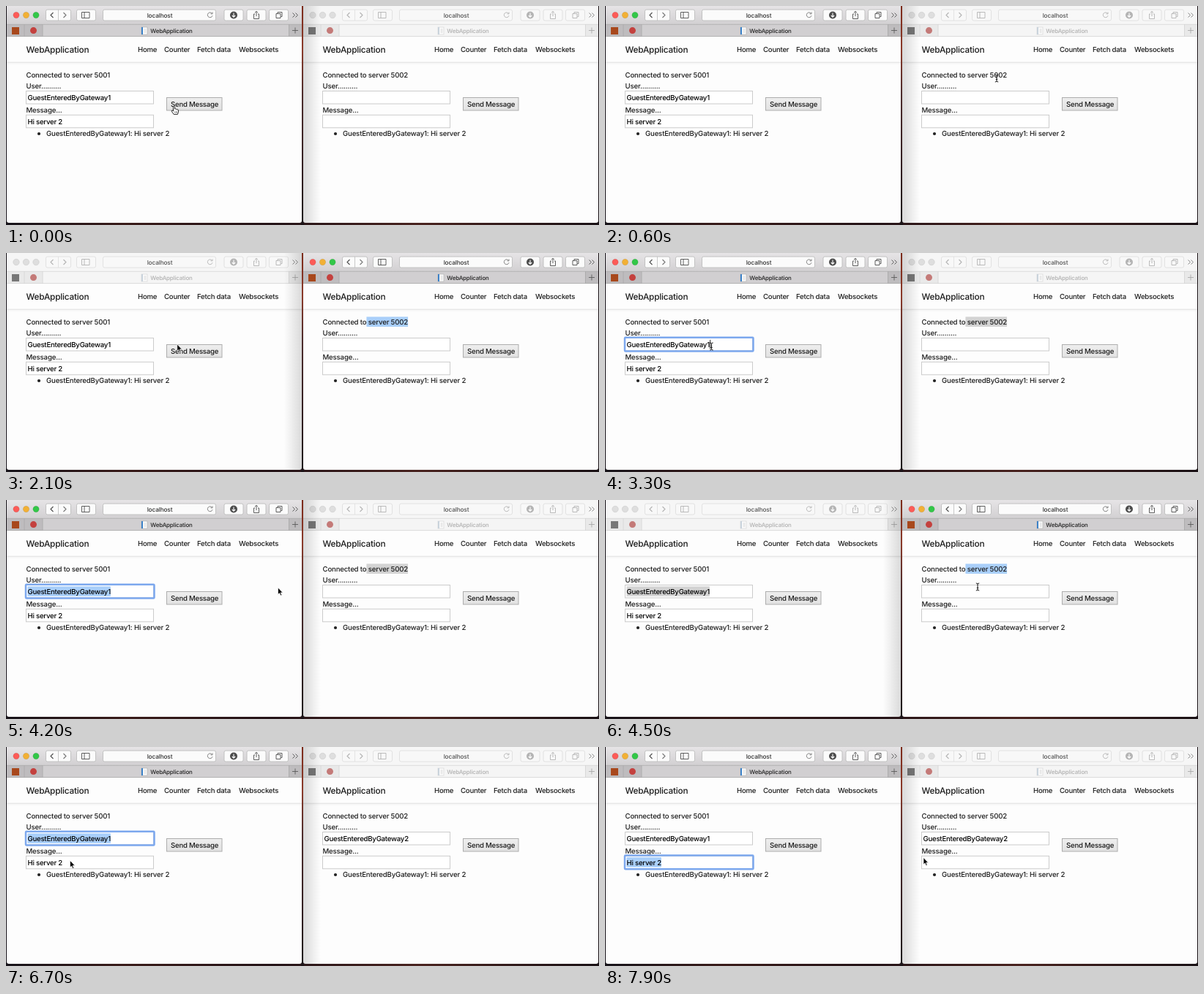
Animation of 810x300 px, one loop 8000 ms. Source, as an HTML page:

```html
<!DOCTYPE html>
<html lang="en">
<head>
<meta charset="utf-8">
<title>Two connected browsers</title>
<style>
html, body { margin: 0; width: 100%; height: 100%; overflow: hidden; background: #2b1613; }
svg { display: block; width: 810px; height: 300px; }
text { font: 450 9.65px Inter, "Open Sans", sans-serif; letter-spacing: -.018em; text-rendering: geometricPrecision; fill: #1c1c1c; white-space: pre; }
.brand { font-size: 11.8px; }
.nav { letter-spacing: -.025em; }
.tab { font-size: 7.9px; }
.addr { font-size: 8.3px; }
.field { fill: #000; }
</style>
</head>
<body>
<svg id="stage" viewBox="0 0 810 300">
  <defs>
    <linearGradient id="bar" x2="0" y2="1"><stop stop-color="#e6e4e6"/><stop offset="1" stop-color="#d2d0d2"/></linearGradient>
    <linearGradient id="desk"><stop stop-color="#17141a"/><stop offset=".2" stop-color="#3a1c1a"/><stop offset=".45" stop-color="#241418"/><stop offset=".7" stop-color="#4a2420"/><stop offset="1" stop-color="#1a1216"/></linearGradient>
    <linearGradient id="gap" x2="0" y2="1"><stop stop-color="#7c2c1c"/><stop offset=".2" stop-color="#8a3a2a"/><stop offset=".4" stop-color="#4c2c2c"/><stop offset="1" stop-color="#1c1418"/></linearGradient>
    <linearGradient id="push" x2="0" y2="1"><stop stop-color="#eeeeee"/><stop offset="1" stop-color="#e2e2e2"/></linearGradient>
    <linearGradient id="shadeL"><stop stop-color="#000" stop-opacity="0"/><stop offset="1" stop-color="#000" stop-opacity=".14"/></linearGradient>
    <linearGradient id="shadeR"><stop stop-color="#000" stop-opacity=".14"/><stop offset="1" stop-color="#000" stop-opacity="0"/></linearGradient>
  </defs>
</svg>
<script>
const LOOP = 8000, STEP = 100;
const GUEST = "GuestEnteredByGateway";
const stage = document.getElementById("stage");

function el(tag, attrs, parent, content) {
  const node = document.createElementNS("http://www.w3.org/2000/svg", tag);
  for (const k in attrs) node.setAttribute(k, attrs[k]);
  if (content) node.textContent = content;
  parent.append(node);
  return node;
}
const box = (g, x, y, w, h, fill, more) => el("rect", { x, y, width: w, height: h, fill, ...more }, g);
const line = (g, d, stroke, width = 1, more) =>
  el("path", { d, fill: "none", stroke, "stroke-width": width, ...more }, g);
const dot = (g, cx, cy, r, fill, more) => el("circle", { cx, cy, r, fill, ...more }, g);
const label = (g, x, y, str, cls = "", more) => el("text", { x, y, class: cls, ...more }, g, str);
const show = (node, on) => node.setAttribute("visibility", on ? "visible" : "hidden");

function drawChrome(parent, on) {
  const g = el("g", {}, parent);
  const ink = on ? "#4c4c4c" : "#b4b4b4";
  const rim = on ? "#bdbdbd" : "#dedede";
  const face = on ? "#fbfbfb" : "#f8f8f8";
  const edge = on ? "#a9a9a9" : "#d3d3d3";
  const mid = { "text-anchor": "middle" };

  box(g, 1, 0, 403, 25, on ? "url(#bar)" : "#f6f6f6");
  ["#fc5b57", "#f2b035", "#33c748"].forEach((c, i) =>
    dot(g, 14 + i * 13.5, 12.5, 4.2, on ? c : "#dedede", { stroke: on ? "#0002" : "#cbcbcb", "stroke-width": .6 }));

  const key = (x, w) => box(g, x, 5, w, 15, face, { rx: 2.2, stroke: rim, "stroke-width": .9 });
  key(54.5, 34); key(96.5, 26); key(132.5, 154); key(298, 26); key(329, 26); key(359.5, 26);
  line(g, "M71.5 5V20", rim, .8);
  line(g, "M64.5 9L61 12.5L64.5 16", ink, 1.1);
  line(g, "M78.5 9L82 12.5L78.5 16", on ? "#777" : ink, 1.1);
  line(g, "M103.5 8.5H114V16.5H103.5ZM107 8.5V16.5", ink, .9);
  line(g, "M281.5 10.3A3.4 3.4 0 1 0 282 13.2M282 8.4V10.8H279.6", on ? "#777" : ink, .9);
  dot(g, 311, 12.5, 5, ink);
  line(g, "M311 9.5V15M308.8 13L311 15.2L313.2 13", "#fff", 1.1);
  line(g, "M340 11H338.5V17.5H345.5V11H344M342 14V7.5M340 9.2L342 7.2L344 9.2", ink, .9);
  line(g, "M371 10V8.5H377V14.5H375.5M369 10.5H375V16.5H369Z", ink, .9);
  line(g, "M391.5 9.5L394.5 12.5L391.5 15.5M395.5 9.5L398.5 12.5L395.5 15.5", on ? "#5a5a5a" : "#888", 1);
  label(g, 210, 15.7, "localhost", "addr", { ...mid, style: `fill:${on ? "#333" : "#555"}` });

  box(g, 1, 25, 403, 17, on ? "#bebcbe" : "#e9e9e9");
  box(g, 50, 25, 336, 17, on ? "#d1cfd1" : "#f5f5f5");
  line(g, "M1 25.3H404", edge, .7);
  line(g, "M1 41.6H404M25 25V42M50 25V42M386.5 25V42", edge, .8);
  box(g, 8, 29, 10, 10, on ? "#a8481c" : "#777");
  dot(g, 37.5, 33.6, 4.5, on ? "#c4413e" : "#c47a78");
  box(g, 185, 29, 8, 10, on ? "#fafafa" : "#fbfbfb", { stroke: on ? "#aaa" : "#d0d0d0", "stroke-width": .6 });
  box(g, 185, 29, 2, 10, on ? "#3c82c8" : "#c9d3dc");
  line(g, "M188.5 32H191.5M188.5 34H191.5M188.5 36H191.5", "#c2c2c2", .6);
  label(g, 226, 36.8, "WebApplication", "tab", { ...mid, style: `fill:${on ? "#222" : "#b0b0b0"}` });
  line(g, "M391 33.5H399M395 29.5V37.5", on ? "#5c5c5c" : "#aaa", .9);
  return g;
}

// A text with a selection behind it and a caret.
function drawText(g, x, y, str, cls) {
  const mark = box(g, x, y - 10.6, 0, 13.6, "#a9cffa");
  const text = label(g, x, y, str, cls);
  const caret = box(g, x, y - 10, .9, 12.5, "#111");
  const at = n => x + (n > 0 ? text.getSubStringLength(0, n) : 0);
  return {
    set(s) { if (text.textContent !== s) text.textContent = s; },
    select(from, to, fill) {
      const a = at(from);
      mark.setAttribute("x", a);
      mark.setAttribute("width", to > from ? at(to) - a : 0);
      mark.setAttribute("fill", fill);
    },
    caret(on) {
      caret.setAttribute("x", at(text.textContent.length) + .4);
      show(caret, on);
    }
  };
}

function drawField(g, y) {
  box(g, 27.5, y, 174, 17.5, "#fff", { stroke: "#cbcbcb", "stroke-width": 1 });
  const ring = box(g, 27, y - .8, 175.5, 18.8, "none", { stroke: "#7ca8ee", "stroke-width": 2.5, rx: 1 });
  const text = drawText(g, 29.5, y + 12.4, "", "field nav");
  return { ...text, focus: on => show(ring, on) };
}

function drawWindow(x, port, shadeX, shadeFill) {
  const g = el("g", { transform: `translate(${x})` }, stage);
  box(g, 1, 30, 403, 267, "#fdfdfd", { rx: 3 });
  const on = drawChrome(g, true), off = drawChrome(g, false);

  box(g, 1, 77, 403, 3, "#000", { opacity: .018 });
  line(g, "M1 77.2H404", "#dedede", .9);
  label(g, 27.5, 64, "WebApplication", "brand");
  [["Home", 180], ["Counter", 216], ["Fetch data", 261], ["Websockets", 318]]
    .forEach(([s, nx]) => label(g, nx, 63, s, "nav"));
  const head = drawText(g, 27.5, 98, "Connected to server " + port);
  head.caret(false);
  label(g, 27.5, 112.6, "User..........");
  label(g, 27.5, 145.6, "Message...");
  const user = drawField(g, 116.5), msg = drawField(g, 149.3);
  box(g, 219.5, 125.5, 75.5, 17.5, "url(#push)", { stroke: "#adadad", "stroke-width": 1 });
  label(g, 225, 137.8, "Send Message", "nav");
  dot(g, 45, 175, 2.1, "#222");
  label(g, 55, 178.4, GUEST + "1: Hi server 2");

  const shade = box(g, shadeX, 0, 24, 297, shadeFill);
  return {
    head, user, msg,
    activate(yes) { show(on, yes); show(off, !yes); show(shade, !yes); }
  };
}

box(stage, 0, 0, 810, 300, "url(#desk)");
box(stage, 403, 0, 4, 300, "url(#gap)");
const left = drawWindow(0, 5001, 380, "url(#shadeL)");
const right = drawWindow(405, 5002, 1, "url(#shadeR)");

// Pointers, each with its hot spot at 0,0.
const pointer = el("g", {}, stage);
const shapes = { arrow: el("g", {}, pointer), beam: el("g", {}, pointer), hand: el("g", {}, pointer) };
el("path", { d: "M0 0V9.4L2.1 7.5L3.6 10.9L5.2 10.2L3.7 6.9H6.6Z", fill: "#000", stroke: "#fff", "stroke-width": .7 }, shapes.arrow);
line(shapes.beam, "M-2.2 -5Q0 -5 0 -3.6V3.6Q0 5 -2.2 5M2.2 -5Q0 -5 0 -3.6M0 3.6Q0 5 2.2 5M-1.2 1.4H1.2", "#111", 1);
el("path", {
  d: "M-1 .8Q0 -.7 1 .8V4Q2.2 3.4 2.8 4.4Q4 3.9 4.5 5Q6 4.8 6 6.2V8.2L4.9 11.4H-.3L-3.2 7.4Q-3.6 5.8 -2.2 6L-1 7Z",
  fill: "#fff", stroke: "#111", "stroke-width": .9, "stroke-linejoin": "round"
}, shapes.hand);
line(shapes.hand, "M1.2 7.4V9.6M2.8 7.4V9.6M4.2 7.4V9.6", "#333", .6);

// time, x, y, pointer shape from then on
const path = [
  [0, 229.5, 137, "hand"], [200, 262, 132, "arrow"], [600, 535, 99, "beam"], [800, 550, 95, "beam"],
  [900, 549, 95, "beam"], [1300, 493, 95, "beam"], [1600, 459.5, 104, "beam"], [1800, 425, 110, "arrow"],
  [2200, 170, 130, "arrow"], [2500, 146, 128, "beam"], [3300, 145.5, 128, "beam"], [3800, 28, 126, "beam"],
  [3900, 28, 126, "arrow"], [4300, 486, 118, "arrow"], [4500, 509, 119, "beam"], [4700, 506.5, 123, "beam"],
  [5900, 506.5, 123, "arrow"], [6400, 130, 152, "arrow"], [6700, 87.5, 155.5, "arrow"], [6800, 80, 158, "beam"],
  [6900, 77, 158, "beam"], [7200, 28, 158, "beam"], [7300, 14, 164, "arrow"], [7600, 180, 209, "arrow"],
  [7800, 370, 178, "arrow"], [7900, 435, 151.5, "arrow"], [8000, 442, 148, "arrow"]
];

function movePointer(t) {
  let i = path.length - 2;
  while (path[i][0] > t) i--;
  const [t0, x0, y0, kind] = path[i], [t1, x1, y1] = path[i + 1];
  const k = (t - t0) / (t1 - t0);
  pointer.setAttribute("transform", `translate(${x0 + (x1 - x0) * k} ${y0 + (y1 - y0) * k})`);
  for (const s in shapes) show(shapes[s], s === kind);
}

const between = (t, a, b) => t >= a && t < b;
// Start of a selection dragged leftwards from position n down to end.
const drag = (t, a, b, n, end) =>
  Math.round(n + (end - n) * Math.min(1, Math.max(0, (t - a) / (b - a))));

function render(t) {
  const onRight = between(t, 800, 2300) || between(t, 4400, 6500);
  const blue = "#a9cffa", grey = "#d3d3d3";
  const tintL = onRight ? grey : blue, tintR = onRight ? blue : grey;
  left.activate(!onRight);
  right.activate(onRight);

  const first = GUEST + "1", hi = "Hi server 2";
  left.user.set(first);
  left.msg.set(hi);
  const inMsg = t >= 6900;
  left.user.focus(!onRight && between(t, 2500, 6900));
  left.user.caret(between(t, 2500, 3400));
  left.user.select(inMsg ? 22 : drag(t, 3300, 3800, 22, 0), 22, tintL);
  left.msg.focus(inMsg);
  left.msg.caret(false);
  left.msg.select(drag(t, 6900, 7200, 11, 0), 11, tintL);

  const inUser = onRight && t >= 4700;
  right.head.select(t < 4700 ? drag(t, 900, 1300, 24, 12) : 24, 24, tintR);
  right.user.set(t < 5000 ? "" : t < 5600 ? first : t < 5800 ? GUEST : GUEST + "2");
  right.user.focus(inUser);
  right.user.caret(inUser);
  right.msg.focus(false);
  right.msg.caret(false);

  movePointer(t);
}

const start = performance.now();
function tick() {
  const t = (performance.now() - start) % LOOP;
  render(Math.floor(t / STEP) * STEP);
  requestAnimationFrame(tick);
}
tick();
</script>
</body>
</html>
```
